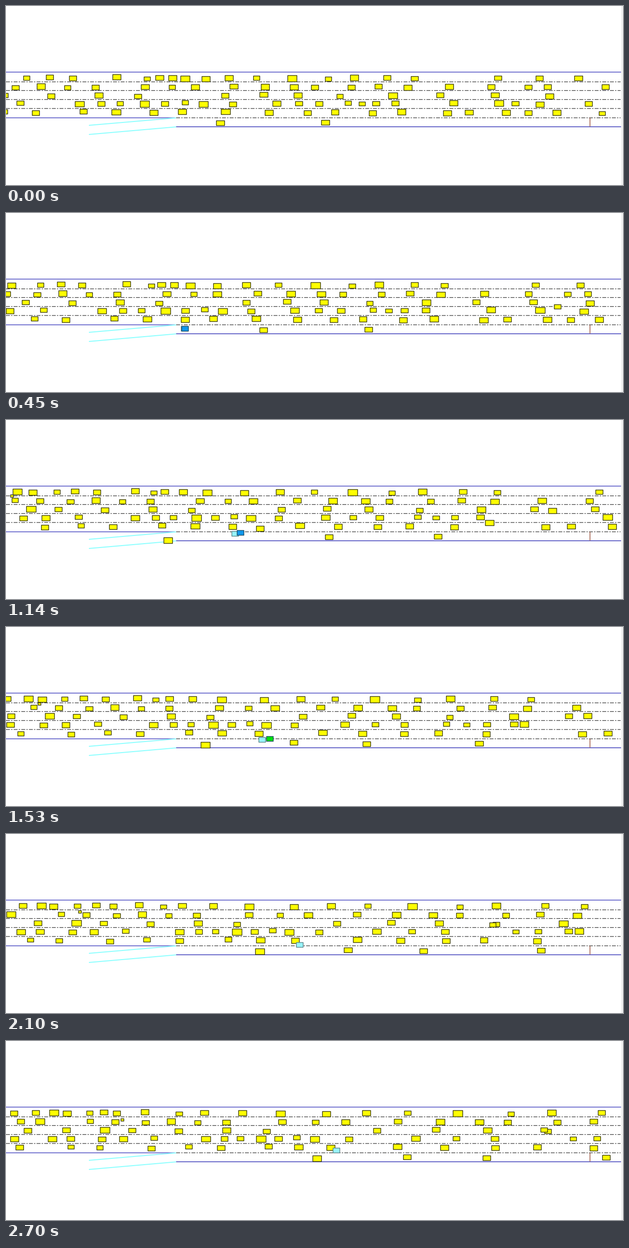
These frames come from a looping animation (1280 px wide and 372 px high, 2.73 s). A matplotlib script:

```python
import numpy as np
import matplotlib.pyplot as plt
from matplotlib.animation import FuncAnimation
from matplotlib.collections import PolyCollection
from matplotlib.patches import Rectangle

W, H, DPI = 1280, 372, 100
FRAMES, STEP = 91, 30
PX = 72 / DPI
ROAD_END = 1276
RAMP_START, RAMP_LANE = 330, 5
YELLOW, BLUE, GREEN, CYAN = "#ffff00", "#1098ec", "#00e010", "#98f4fa"
CAR_EDGE = "#38380c"

LANE_Y = (148.7, 167.7, 185.3, 202.2, 220.5, 241.8)

# Where the traffic of each lane stands at the start; negatives drive in later
STARTS = (
    (-155, -98, -51, -18, 42, 90, 138, 229, 292, 318, 345, 371, 414, 462,
     519, 593, 668, 722, 790, 847, 1020, 1106, 1187),
    (-240, -200, -96, -44, 19, 72, 127, 185, 288, 344, 392, 472, 537, 597,
     640, 716, 772, 833, 919, 1006, 1083, 1123, 1243),
    (-220, -140, -60, -4, 93, 192, 273, 454, 534, 605, 692, 802, 900, 1014, 1127),
    (-280, -200, -160, -90, -42, 29, 152, 197, 236, 287, 329, 371, 409, 470,
     561, 607, 649, 709, 738, 767, 807, 928, 1022, 1056, 1107, 1208),
    (-345, -240, -181, -78, -4, 61, 160, 228, 306, 365, 455, 545, 625, 682,
     760, 820, 915, 960, 1037, 1083, 1142, 1236),
    (110, 444, 662),
)

# Speed along each lane: positions, then pixels per second
SPEEDS = (
    ((70, 150, 240, 330, 350, 400, 480, 560, 750, 1180),
     (65, 40, 50, 8, 4, 35, 78, 106, 112, 195)),
    ((400, 1200), (100, 190)),
    ((480, 600, 750, 900, 1200), (98, 115, 143, 163, 190)),
    ((0, 300, 520, 600, 750, 950, 1150), (110, 97, 82, 85, 120, 170, 205)),
    ((0, 350, 500, 650, 850, 1100), (138, 145, 140, 120, 150, 195)),
    ((700, 1000), (198, 225)),
)
JAM_DRIFT = 40  # the jam in the top lane rolls backwards

# Lane changes: lane, start position, direction, begin and duration in seconds
MOVES = ((4, 365, 1, 0.9, 0.7), (4, 820, -1, 0.9, 0.6), (3, 709, -1, 1.5, 0.9),
         (3, 928, -1, 0.3, 1.2), (3, 1056, -1, -0.2, 1.2))

home = np.repeat(np.arange(len(STARTS)), [len(s) for s in STARTS])
start = np.concatenate(STARTS).astype(float)
rng = np.random.default_rng(4)
bulk = rng.normal(0, 1, len(start)).clip(-1.4, 2.2)
width, height = 16 + 1.8 * bulk, 10.3 + bulk
wobble = rng.normal(0, 1.1, len(start)).clip(-2, 2)


def ease(u):
    u = np.clip(u, 0, 1)
    return u * u * (3 - 2 * u)


def lanes_at(t):
    lane = home.astype(float)
    for number, x, way, begin, span in MOVES:
        lane[(home == number) & (start == x)] += way * ease((t - begin) / span)
    return lane


def speeds_at(x, lane, t):
    shift = [JAM_DRIFT * t] + [0] * (len(SPEEDS) - 1)
    fields = [np.interp(x + d, *s) for d, s in zip(shift, SPEEDS)]
    return np.choose(np.rint(lane).astype(int), fields)


def drive():
    """Positions of all cars in every frame."""
    x, path = start.copy(), []
    for i in range(FRAMES):
        path.append(x.copy())
        t = i * STEP / 1000
        x += speeds_at(x, lanes_at(t), t) * STEP / 1000
    return path


def box(x, y, w, h):
    x, y = x + 0.5 - w / 2, y + 0.5 - h / 2
    return [(x, y), (x + w, y), (x + w, y + h), (x, y + h)]


path = drive()

fig = plt.figure(figsize=(W / DPI, H / DPI), dpi=DPI, facecolor="white")
ax = fig.add_axes([0, 0, 1, 1])
ax.set_xlim(0, W)
ax.set_ylim(H, 0)
ax.axis("off")


def line(x0, y0, x1, y1, color, width, **kw):
    ax.plot([x0, x1], [y0, y1], color=color, lw=width * PX,
            solid_capstyle="butt", snap=False, zorder=1, **kw)


for y, x in ((157.6, 0), (175.6, 0), (194.4, 0), (213, 0), (232.4, 353)):
    line(x, y, ROAD_END - 1, y, "#3c3c3c", 1.3, dashes=(6.2, 2, 2, 2))
line(0, 137.4, ROAD_END, 137.4, "#5050c4", 1.6)
line(0, 232.4, 350, 232.4, "#5050c4", 1.6)
line(353, 251, ROAD_END, 251, "#4444bc", 1.6)
line(172, 248, 353, 232.5, "#8cffff", 2)
line(172, 267, 353, 251.2, "#8cffff", 2)
line(1211.5, 232.5, 1211.5, 250.5, "#a05a48", 1.6)
ax.add_patch(Rectangle((ROAD_END, 0), W - ROAD_END, H, color="#f0f0f0", lw=0, zorder=3))

boxes = PolyCollection([], linewidths=1.4 * PX, zorder=2)
ax.add_collection(boxes, autolim=False)


def draw(i):
    t, x = i * STEP / 1000, path[i]
    y = np.interp(lanes_at(t), range(len(LANE_Y)), LANE_Y) + wobble
    on_ramp = home == RAMP_LANE
    y += on_ramp * 0.065 * np.maximum(0, 420 - x)
    seen = (x + width / 2 < ROAD_END - 4) & ~(on_ramp & (x < RAMP_START))

    shown = [(box(*car), YELLOW, CAR_EDGE)
             for car in zip(x[seen], y[seen], width[seen], height[seen])]
    if t > 1.05:
        shown.append((box(147 * t - 156, 153 + 3.6 * t, 6, 5), YELLOW, CAR_EDGE))

    # The merging car and the marker that runs ahead of it
    merge_x = 297 + 165 * t - 8 * t * t
    if merge_x > RAMP_START:
        shown.append((box(merge_x, 242.5 - 6 * t, 14, 10), CYAN, "#5a8488"))
        if t < 1.8:
            ahead = box(291 + 182 * t - 10 * t * t, max(231, 243 - 8.5 * t), 14, 10)
            shown.append((ahead, BLUE if t < 1.4 else GREEN, "#1c4c64"))

    verts, fills, edges = zip(*shown)
    boxes.set_verts(verts)
    boxes.set_facecolor(fills)
    boxes.set_edgecolor(edges)
    return [boxes]


anim = FuncAnimation(fig, draw, frames=FRAMES, interval=STEP, repeat=True,
                     repeat_delay=0, blit=False)
plt.show()
```
